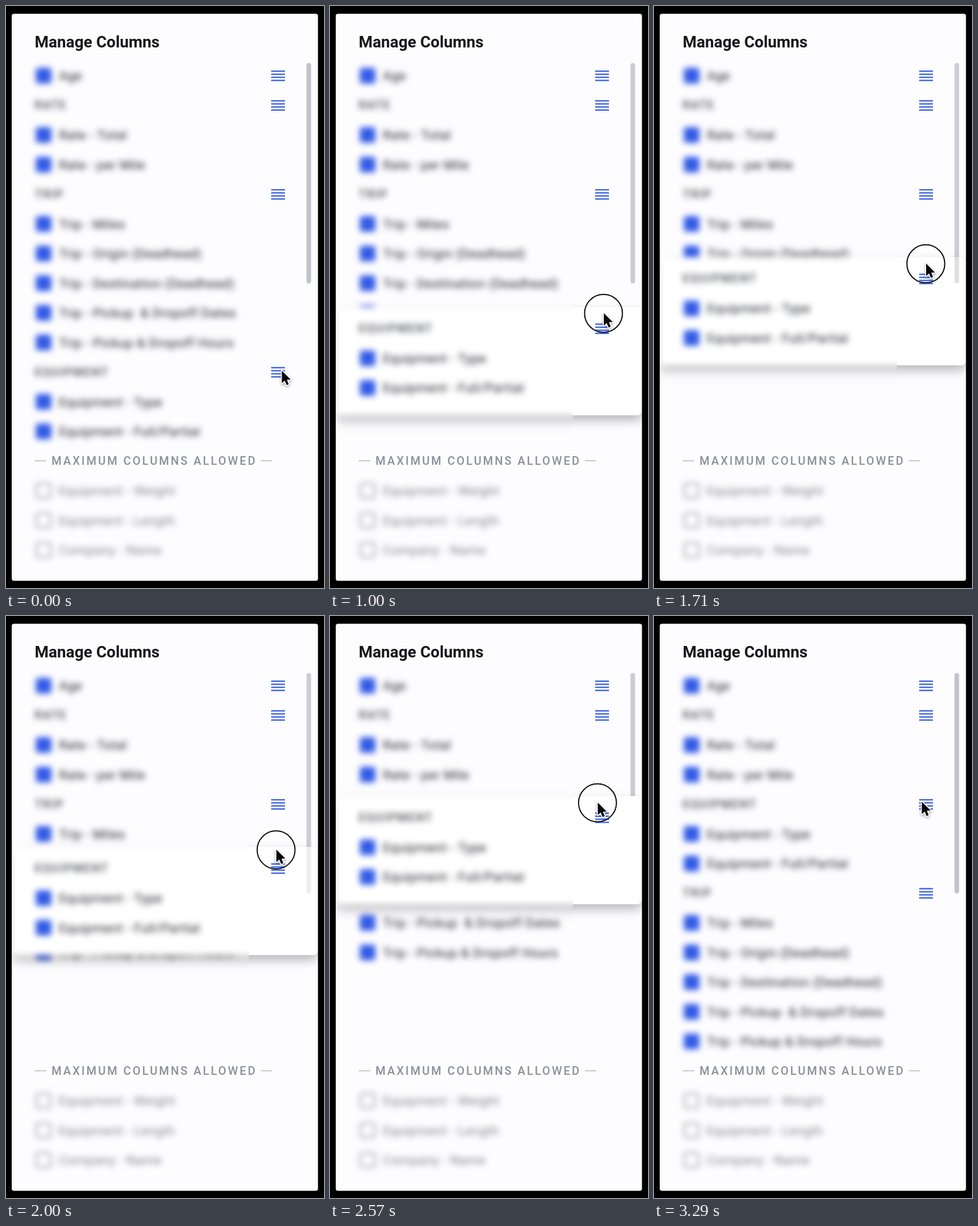
These frames come from a looping animation (554 px wide and 1011 px high, 3570 ms). An HTML page with a canvas:

```html
<!DOCTYPE html>
<html lang="en">
<head>
<meta charset="utf-8">
<title>Manage Columns</title>
<style>
  html, body { margin: 0; height: 100%; overflow: hidden; background: #000; }
  canvas { display: block; }
</style>
</head>
<body>
<canvas id="stage" width="554" height="1011"></canvas>
<script>
const LOOP = 3570, FPS = 7, LAST = 23;
const LIFT = 290, DROP = 3000, REST = 3290;
const W = 554, H = 1011;
const PANEL = { x: 10, y: 13.5, w: 533.5, h: 985 };
const TOP = 121, PITCH = 51.5;
const CARD_H = 188, CARD_PAD = 37.5;
const BLUR_RIGHT = 423;
const BLUE = '#456ae3', PAPER = '#fdfcfe';

const FIRST = ['Age', '#RATE', 'Rate - Total', 'Rate - per Mile'];
const TRIP = ['#TRIP', 'Trip - Miles', 'Trip - Origin (Deadhead)',
  'Trip - Destination (Deadhead)', 'Trip - Pickup  & Dropoff Dates',
  'Trip - Pickup & Dropoff Hours'];
const EQUIPMENT = ['#EQUIPMENT', 'Equipment - Type', 'Equipment - Full/Partial'];
const UNUSED = ['Equipment - Weight', 'Equipment - Length', 'Company - Name'];

const stage = document.getElementById('stage').getContext('2d');
const layer = document.createElement('canvas');
layer.width = W;
layer.height = H;
const ctx = layer.getContext('2d');

const ramp = (t, a, b) => Math.min(1, Math.max(0, (t - a) / (b - a)));
const slot = i => TOP + PITCH * i;

// Start value plus a sum of straight moves: from, to, distance
const travel = (t, start, ...moves) =>
  moves.reduce((v, [a, b, d]) => v + d * ramp(t, a, b), start);

// A quick grab, a pause, then a steady pull upwards
const pointerX = t => travel(t, 480, [LIFT, 570, -3.5], [1430, 2430, -10.5]);
const pointerY = t => travel(t, 634, [LIFT, 570, -69], [710, 1430, -77],
  [1430, 2860, -219 + 14], [2860, REST, 40]);
const cardY = t => travel(t, 598, [430, 710, -58], [860, 2000, -139], [2000, 2710, -110]);

function box(c, x, y, w, h, r) {
  c.beginPath();
  c.roundRect(x, y, w, h, r);
}

function text(str, x, y, font, color, spacing = 0) {
  ctx.font = font + ' Roboto, sans-serif';
  ctx.letterSpacing = spacing + 'px';
  ctx.fillStyle = color;
  ctx.fillText(str, x, y);
}

function handle(y) {
  ctx.fillStyle = BLUE;
  for (let i = 0; i < 4; i++) ctx.fillRect(462, y - 9 + i * 5.33, 24, 2.5);
}

function checkbox(y, on) {
  if (on) {
    box(ctx, 52, y - 13.5, 27, 27, 4);
    ctx.fillStyle = '#315ae6';
    ctx.fill();
  } else {
    box(ctx, 53, y - 12.5, 25, 25, 4);
    ctx.strokeStyle = '#95979d';
    ctx.lineWidth = 2.5;
    ctx.stroke();
  }
}

function rows(list, y, on = true) {
  list.forEach((name, i) => {
    const cy = y + i * PITCH;
    const heading = name[0] === '#';
    if (heading) {
      text(name.slice(1), 50, cy + 6.5, '500 20px', '#44464c', 2);
    } else {
      checkbox(cy, on);
      text(name, 92, cy + 8, '400 22.5px', on ? '#1c1e24' : '#7f828a', .5);
    }
    if (on && (heading || name === 'Age')) handle(cy);
  });
}

function scrollbar(color) {
  box(ctx, 523.5, 99, 8, 383, 4);
  ctx.fillStyle = color;
  ctx.fill();
}

function card(y, depth) {
  ctx.save();
  ctx.shadowColor = `rgba(0,0,0,${.27 * depth})`;
  ctx.shadowBlur = 18;
  ctx.shadowOffsetY = 9;
  box(ctx, PANEL.x, y, PANEL.w, CARD_H, 8);
  ctx.fillStyle = '#fff';
  ctx.fill();
  ctx.restore();
}

function divider() {
  ctx.fillStyle = '#c6c9cf';
  ctx.fillRect(50, 789, 20, 2);
  ctx.fillRect(444, 789, 20, 2);
  text('MAXIMUM COLUMNS ALLOWED', 79.3, 797, '500 20px', '#8c9099', 2.87);
}

function drawList(t) {
  const lifted = t >= LIFT && t < REST;
  const settle = ramp(t, DROP, REST);
  const y = cardY(t);
  const bar = lifted ? '#cacdd4' : '#c0c3cd';

  ctx.fillStyle = PAPER;
  ctx.fillRect(0, 0, W, H);
  text('Manage Columns', 50, 72, '700 27.7px', '#17181c');
  scrollbar(bar);
  rows(FIRST, slot(0));
  ctx.globalAlpha = 1 - settle;
  rows(TRIP, slot(4));
  ctx.globalAlpha = settle;
  rows(TRIP, slot(7));
  ctx.globalAlpha = 1;
  divider();
  rows(UNUSED, slot(14), false);

  if (lifted) {
    card(y, ramp(t, 140, 430) * (1 - settle));
    // The scrollbar fades slowly where the card covers it
    ctx.save();
    ctx.beginPath();
    ctx.rect(0, y, W, CARD_H);
    ctx.clip();
    ctx.globalAlpha = Math.max((1 - ramp(t, 1430, 2640)) ** 1.8, settle);
    scrollbar(bar);
    ctx.restore();
  }
  rows(EQUIPMENT, lifted ? y + CARD_PAD : slot(t < LIFT ? 10 : 4));
}

function frost(y, h) {
  stage.save();
  stage.beginPath();
  stage.rect(PANEL.x, y, BLUR_RIGHT - PANEL.x, h);
  stage.clip();
  stage.filter = 'blur(5.5px)';
  stage.drawImage(layer, 0, 0);
  stage.restore();
}

function arrow(x, y) {
  stage.save();
  stage.translate(x + .5, y - .5);
  stage.scale(1.32, 1.32);
  stage.lineJoin = 'round';
  stage.lineWidth = 2.6;
  stage.strokeStyle = '#fff';
  stage.fillStyle = '#08080a';
  stage.shadowColor = 'rgba(0,0,0,.35)';
  stage.shadowBlur = 4;
  stage.shadowOffsetY = 2;
  const shape = new Path2D('M0 0V16.5L3.8 13L6.4 19L9.2 17.8L6.7 12L11.8 11.8Z');
  stage.stroke(shape);
  stage.shadowColor = 'transparent';
  stage.fill(shape);
  stage.restore();
}

function pointer(t) {
  const x = pointerX(t), y = pointerY(t);
  if (t >= LIFT && t < DROP) {
    stage.beginPath();
    stage.arc(x, y, 33, 0, 7);
    stage.strokeStyle = '#0b0b0d';
    stage.lineWidth = 2;
    stage.stroke();
  }
  arrow(x, y);
}

function draw(t) {
  drawList(t);
  stage.fillStyle = '#000';
  stage.fillRect(0, 0, W, H);
  stage.save();
  box(stage, PANEL.x, PANEL.y, PANEL.w, PANEL.h, 4);
  stage.clip();
  stage.drawImage(layer, 0, 0);
  frost(92, 680);
  frost(812, 170);
  pointer(t);
  stage.restore();
}

// The motion runs in steps of a seventh of a second
let shown = -1;
function tick() {
  const t = performance.now() % LOOP;
  const step = Math.min(LAST, Math.floor(t * FPS / 1000 + .04));
  if (step !== shown) {
    shown = step;
    draw(Math.round(step * 100 / FPS) * 10);
  }
  requestAnimationFrame(tick);
}
tick();
</script>
</body>
</html>
```
